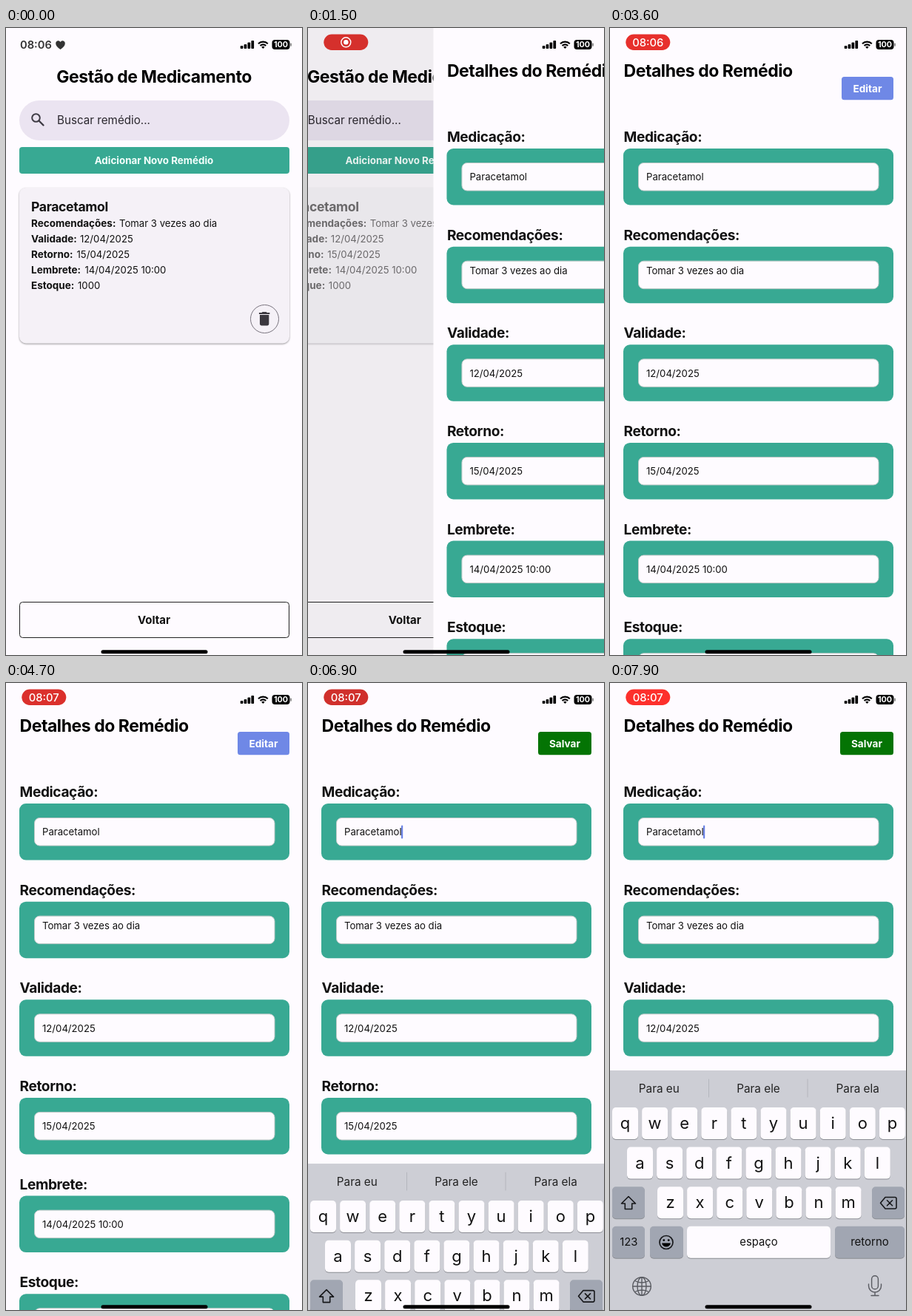
An HTML page that plays this animation: 400 px wide and 848 px high, repeating every 8 s.

```html
<!DOCTYPE html>
<html lang="pt">
<head>
<meta charset="utf-8">
<style>
  html, body { margin: 0; width: 100%; height: 100%; overflow: hidden; background: #fefbff; }
  svg { display: block; width: 400px; height: 848px; }
  text { font-family: Inter, Roboto, "Liberation Sans", sans-serif; font-optical-sizing: none; }
  .tight { letter-spacing: -.02em; }
  #card > rect { filter: drop-shadow(0 1px 1.2px rgba(0, 0, 0, .4)); }
</style>
</head>
<body>
<svg id="stage" viewBox="0 0 400 848"></svg>
<script>
const GREEN = '#38a993', PAGE = '#fefbff', DARK_KEY = '#a1a6b2';

// Markup helpers
const text = (x, y, size, str, {weight = 400, fill = '#111', mid, id = ''} = {}) =>
  `<text id="${id}" x="${x}" y="${y}" font-size="${size}" font-weight="${weight}" fill="${fill}"
    ${mid ? 'text-anchor="middle"' : ''} ${size > 17 && weight > 400 ? 'class="tight"' : ''}>${str}</text>`;
const rect = (x, y, w, h, r, fill, extra = '') =>
  `<rect x="${x}" y="${y}" width="${w}" height="${h}" rx="${r}" fill="${fill}" ${extra}/>`;
const group = (id, body, extra = '') => `<g id="${id}" ${extra}>${body}</g>`;
const line = (d, color, width, extra = '') =>
  `<path d="${d}" fill="none" stroke="${color}" stroke-width="${width}" stroke-linecap="round" stroke-linejoin="round" ${extra}/>`;
const bold = {weight: 700}, boldMid = {weight: 700, mid: true};

const fields = [
  ['Medicação:', 'Paracetamol'],
  ['Recomendações:', 'Tomar 3 vezes ao dia', 153],
  ['Validade:', '12/04/2025', 100],
  ['Retorno:', '15/04/2025', 95.5],
  ['Lembrete:', '14/04/2025 10:00', 106.5],
  ['Estoque:', '1000', 97]
];

function listPage() {
  const rows = fields.slice(1).map(([label, value, x], i) => {
    const y = 269.3 + 21 * i;
    return text(34, y, 13.5, label, bold) + text(x, y, 13.15, value);
  }).join('');
  const trash = `<circle cx="349.5" cy="393.5" r="19" fill="none" stroke="#79747e"/>
    <path transform="translate(336.8 380.8) scale(1.03)" fill="#3b383f"
      d="M6 19a2 2 0 0 0 2 2h8a2 2 0 0 0 2-2V7H6zM19 4h-3.5l-1-1h-5l-1 1H5v2h14z"/>`;
  return rect(0, 0, 400, 848, 0, PAGE)
    + text(200, 74, 23, 'Gestão de Medicamento', {...boldMid, fill: '#000'})
    + rect(18, 98, 365, 54, 27, '#ebe4f1')
    + line('M44.5 125.5L50.5 131.5', '#3f3c45', 2.4)
    + '<circle cx="40.5" cy="121.5" r="5.3" fill="none" stroke="#3f3c45" stroke-width="2"/>'
    + text(69, 130.3, 15.2, 'Buscar remédio...', {fill: '#2a272e'})
    + rect(18, 161, 365, 36, 4, GREEN)
    + text(200, 184, 13.4, 'Adicionar Novo Remédio', {...boldMid, fill: '#f4fffc'})
    + group('card', rect(18, 216, 365, 210.5, 9, '#f5f1f7')
      + text(34, 247.7, 17.6, 'Paracetamol', bold) + rows + trash)
    + rect(18.5, 776.5, 364, 48, 4, 'none', 'stroke="#222"')
    + text(200, 806, 15, 'Voltar', boldMid);
}

function detailPage() {
  const boxes = fields.map(([label, value], i) => {
    const y = 132.65 * i;
    return text(18.5, 154 + y, 19.1, label, bold)
      + rect(18, 163 + y, 365, 76.5, 9, GREEN)
      + rect(38.5, 182.5 + y, 324.5, 37.5, 7, PAGE, 'stroke="#c2cac9"')
      + text(49, (i === 1 ? 200.8 : 206.2) + y, 13.15, value);
  }).join('');
  const button = (id, x, fill, label) => group(id,
    rect(x, 66, 383 - x, 31.3, 3.5, fill)
    + text((x + 383) / 2, 86.5, 13.6, label, {...boldMid, fill: '#fff'}));
  return rect(0, 0, 400, 848, 0, PAGE)
    + text(18.5, 66, 23, 'Detalhes do Remédio', {...bold, fill: '#000'})
    + button('edit', 313, '#6f88e6', 'Editar')
    + button('save', 311, '#047404', 'Salvar')
    + boxes
    + rect(126, 192.5, 2.2, 18, 1, '#6a82e4', 'id="caret"');
}

function keyboard() {
  const rowY = i => 50 + 53.6 * i;
  const key = (x, row, w, fill = PAGE) =>
    rect(x, rowY(row) + 1, w, 43, 5, '#8b8d93') + rect(x, rowY(row), w, 43, 5, fill);
  const letters = (str, x, row) => [...str].map((c, i) =>
    key(x + 40.1 * i, row, 35)
    + text(x + 40.1 * i + 17.5, rowY(row) + 29, 22, c, {mid: true})).join('');
  const hints = ['Para eu', 'Para ele', 'Para ela'].map((s, i) =>
    text(66.3 + 134.2 * i, 30, 15.3, s, {mid: true, fill: '#222'})).join('');
  const ink = '#17181b', grey = '#595b61';
  const emoji = `<circle cx="76" cy="232.5" r="9" fill="none" stroke="${ink}" stroke-width="1.7"/>
    <circle cx="72.8" cy="229.6" r="1.4"/><circle cx="79.2" cy="229.6" r="1.4"/>
    <path d="M70.2 233.4h11.6a5.8 5.2 0 0 1-11.6 0z"/>`;
  const globe = `<g fill="none" stroke="${grey}" stroke-width="1.4">
    <circle cx="43" cy="292" r="12.3"/><ellipse cx="43" cy="292" rx="6" ry="12.3"/>
    <path d="M43 279.7v24.6M30.7 292h24.6M33.5 284.5q9.5 5 19 0M33.5 299.5q9.5-5 19 0"/></g>`;
  const mic = rect(353.6, 277.8, 8.8, 18, 4.4, 'none', `stroke="${grey}" stroke-width="1.4"`)
    + line('M349.5 289v2.5a8.5 8.5 0 0 0 17 0V289M358 300v4.5M353 304.5h10', grey, 1.4);
  return rect(0, 0, 400, 330, 0, '#cdced5') + hints
    + line('M133.5 12v24M267 12v24', '#b4b6bd', 1)
    + letters('qwertyuiop', 3, 0) + letters('asdfghjkl', 23, 1) + letters('zxcvbnm', 64, 2)
    + key(3, 2, 44, DARK_KEY) + key(354, 2, 44, DARK_KEY)
    + line('M25 170.5L34.5 180H29.7V187.5H20.3V180H15.5Z', ink, 1.6)
    + line('M372 171.5H385a2 2 0 0 1 2 2V185a2 2 0 0 1-2 2H372L365.5 179.2ZM374.5 175.8l7 7M381.5 175.8l-7 7', ink, 1.6)
    + key(3, 3, 44, DARK_KEY) + text(25.3, 237.4, 14.8, '123', {mid: true})
    + key(54, 3, 45, DARK_KEY) + emoji
    + key(104, 3, 194) + text(201, 236.7, 14.8, 'espaço', {mid: true})
    + key(304, 3, 94, DARK_KEY) + text(351, 236.7, 15, 'retorno', {mid: true})
    + globe + mic;
}

function statusBar() {
  const bars = [4, 6, 8.5, 11].map((h, i) =>
    rect(316.7 + 4.9 * i, 28 - h, 3.7, h, 1, '#000')).join('');
  const wifi = line('M341 21.3a9 9 0 0 1 12.8 0M343.6 24a5.2 5.2 0 0 1 7.6 0', '#000', 2.1, 'style="stroke-linecap:butt"')
    + '<path d="M345.2 25.7a3.2 3.2 0 0 1 4.4 0l-2.2 2.3z"/>';
  const heart = '<path fill="#333" d="M73.5 29c-4-2.8-6.3-5.2-6.3-8.3 0-4 4.8-4.6 6.3-1.6 1.5-3 6.3-2.400 6.3 1.6 0 3.100-2.300 5.500-6.300 8.300z"/>';
  const white = {fill: '#fff', weight: 500, mid: true, id: 'pillTime'};
  return bars + wifi
    + rect(359.500, 16, 24, 13, 4, '#000') + rect(384.300, 20.500, 1.500, 4.300, .7, '#777')
    + text(371.500, 26.300, 10.800, '100', {...boldMid, fill: '#fff'})
    + group('clock', text(19, 28, 14.700, '08:06', {weight: 600, fill: '#333'}) + heart)
    + group('pill', rect(21.300, 8.500, 60, 21.500, 10.750, '#f00', 'id="pillBg"')
      + group('rec', `<circle cx="51.300" cy="19.300" r="6.500" fill="none" stroke="#fff" stroke-width="1.400"/>
        <circle cx="51.300" cy="19.300" r="3.200" fill="#fff"/>`)
      + text(51.300, 24.600, 14.800, '08:06', white));
}

document.getElementById('stage').innerHTML =
  group('list', listPage()) + rect(0, 0, 400, 848, 0, '#000', 'id="dim"')
  + group('detail', detailPage()) + group('keys', keyboard())
  + statusBar() + rect(128.5, 841.3, 144, 5, 2.5, '#000');

// Motion helpers
const $ = id => document.getElementById(id);
const ramp = (t, a, b) => Math.min(1, Math.max(0, (t - a) / (b - a)));
const ease = x => x * x * (3 - 2 * x);
const spring = (t, start, rate) => {
  const x = Math.max(0, t - start) / 1000 * rate;
  return 1 - (1 + x) * Math.exp(-x);
};
const press = (t, down, up) =>
  1 - .78 * ease(ramp(t, down, down + 150)) * (1 - ease(ramp(t, up, up + 250)));
const opacity = (id, v) => $(id).setAttribute('opacity', v);
const move = (id, x, y) => $(id).setAttribute('transform', `translate(${x} ${y})`);

function draw(t) {
  // Recording pill
  const grow = ease(ramp(t, 120, 480));
  opacity('clock', 1 - ramp(t, 100, 300));
  opacity('pill', ramp(t, 120, 300));
  const s = .6 + .4 * grow;
  $('pill').setAttribute('transform', `translate(51.3 19.3) scale(${s}) translate(-51.3 -19.3)`);
  const glow = .5 - .5 * Math.cos((t - 1300) / 1850 * 2 * Math.PI);
  $('pillBg').setAttribute('fill', `rgb(${208 + 47 * glow},48,44)`);
  const swap = ramp(t, 2900, 3100);
  opacity('rec', 1 - swap);
  opacity('pillTime', swap);
  $('pillTime').textContent = t < 4400 ? '08:06' : '08:07';

  // Card tap and page push
  opacity('card', press(t, 1050, 1380));
  const push = t >= 1890 ? 1 : spring(t, 1380, 16);
  move('list', -120 * push, 0);
  opacity('dim', .1 * push);
  move('detail', 400 * (1 - push), 0);

  // Edit button becomes save
  const fade = press(t, 4750, 5000);
  opacity('edit', t < 5000 ? fade : 0);
  opacity('save', t < 5000 ? 0 : fade);

  // Keyboard and caret
  move('keys', 0, 524 + 324 * (1 - spring(t, 6788, 18.26)));
  const blink = (t - 6700) % 1000;
  opacity('caret', t < 6700 ? 0 : 1 - ramp(blink, 500, 600) + ramp(blink, 900, 1000));
}

const start = performance.now();
function frame() {
  draw((performance.now() - start) % 8000);
  requestAnimationFrame(frame);
}
frame();
</script>
</body>
</html>
```
